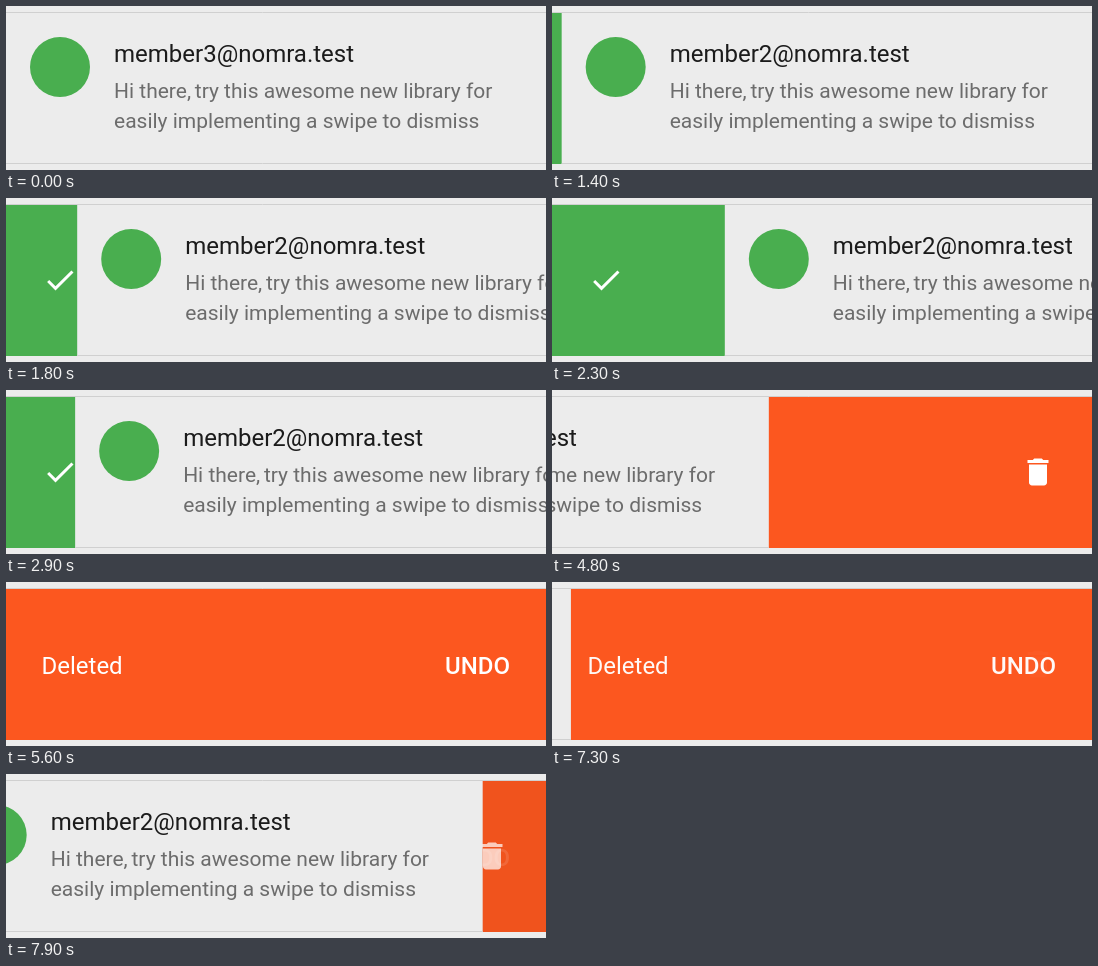
These frames come from a looping animation (540 px wide and 164 px high, 8 s). An HTML page:

```html
<!DOCTYPE html>
<html lang="en">
<head>
<meta charset="utf-8">
<title>Swipe to dismiss</title>
<style>
  html, body { margin: 0; width: 100%; height: 100%; overflow: hidden; background: #ececec; }
  svg { display: block; width: 540px; height: 164px; font-family: Roboto, sans-serif; }
  .mail { font-size: 24px; fill: #1b1b1b; }
  .body { font-size: 21px; fill: #6c6c6c; }
  .undo { font-size: 24px; fill: #fff; }
</style>
</head>
<body>
<svg viewBox="0 0 540 164">
  <defs>
    <clipPath id="cell"><rect y="7" width="540" height="151"/></clipPath>
  </defs>
  <rect width="540" height="164" fill="#ececec"/>
  <path d="M0 6.5H540" stroke="#d0d0d0"/>
  <g clip-path="url(#cell)">
    <rect id="back" y="7" width="540" height="151"/>
    <path id="check" fill="#fff" transform="translate(36 64) scale(1.5)"
      d="M9 16.2L4.8 12l-1.4 1.4L9 19 21 7l-1.4-1.4z"/>
    <g id="undo" class="undo">
      <text x="35.5" y="92">Deleted</text>
      <text x="504" y="92" text-anchor="end" font-weight="500">UNDO</text>
    </g>
    <path id="bin" fill="#fff" transform="translate(468 64) scale(1.5)"
      d="M6 19c0 1.1.9 2 2 2h8c1.1 0 2-.9 2-2V7H6v12zM19 4h-3.5l-1-1h-5l-1 1H5v2h14V4z"/>
    <g id="row">
      <rect y="7" width="540" height="151" fill="#ececec"/>
      <path d="M0 157.5H540" stroke="#d0d0d0"/>
      <circle cx="54" cy="61" r="30" fill="#49ae4f"/>
      <text id="third" class="mail" x="108" y="56">member3@nomra.test</text>
      <text id="second" class="mail" x="108" y="56">member2@nomra.test</text>
      <text class="body" x="108" y="92">Hi there, <tspan dx="-1.5">try this awesome new library for</tspan></text>
      <text class="body" x="108" y="122">easily implementing a swipe to dismiss</text>
    </g>
  </g>
</svg>
<script>
const LOOP = 8000, STEP = 100, WIDTH = 540, PULL = 225, RELEASE = 2800;
const $ = id => document.getElementById(id);
const fade = (id, value) => $(id).setAttribute("opacity", value);

// Progress from 0 to 1 between two times, linear or smooth
const ramp = (t, from, to) => Math.min(1, Math.max(0, (t - from) / (to - from)));
const ease = (t, from, to) => {
  const u = ramp(t, from, to);
  return u * u * (3 - 2 * u);
};

function draw(t) {
  const pull = PULL * ease(t, 1200, RELEASE) * Math.exp(-0.0118 * Math.max(0, t - RELEASE));
  const back = ease(t, 7200, 8090);
  const swipe = WIDTH * (ease(t, 4500, 5030) - back);
  const deleted = ramp(t, 5000, 5500), swap = ramp(t, 0, 300);
  const left = swipe > 0;

  $("row").setAttribute("transform", `translate(${left ? -swipe : pull} 0)`);
  $("back").setAttribute("fill", left ? `rgb(${252 - 14 * back},${87 - 5 * back},${31 - 2 * back})` : "#49ae4f");
  fade("check", left ? 0 : 1);
  fade("undo", left ? deleted - back : 0);
  fade("bin", left ? 1 - deleted + 0.8 * back : 0);
  fade("third", 1 - swap);
  fade("second", swap);
}

const start = performance.now();
function tick() {
  const t = (performance.now() - start) % LOOP;
  draw(Math.floor(t / STEP) * STEP);
  requestAnimationFrame(tick);
}
tick();
</script>
</body>
</html>
```
